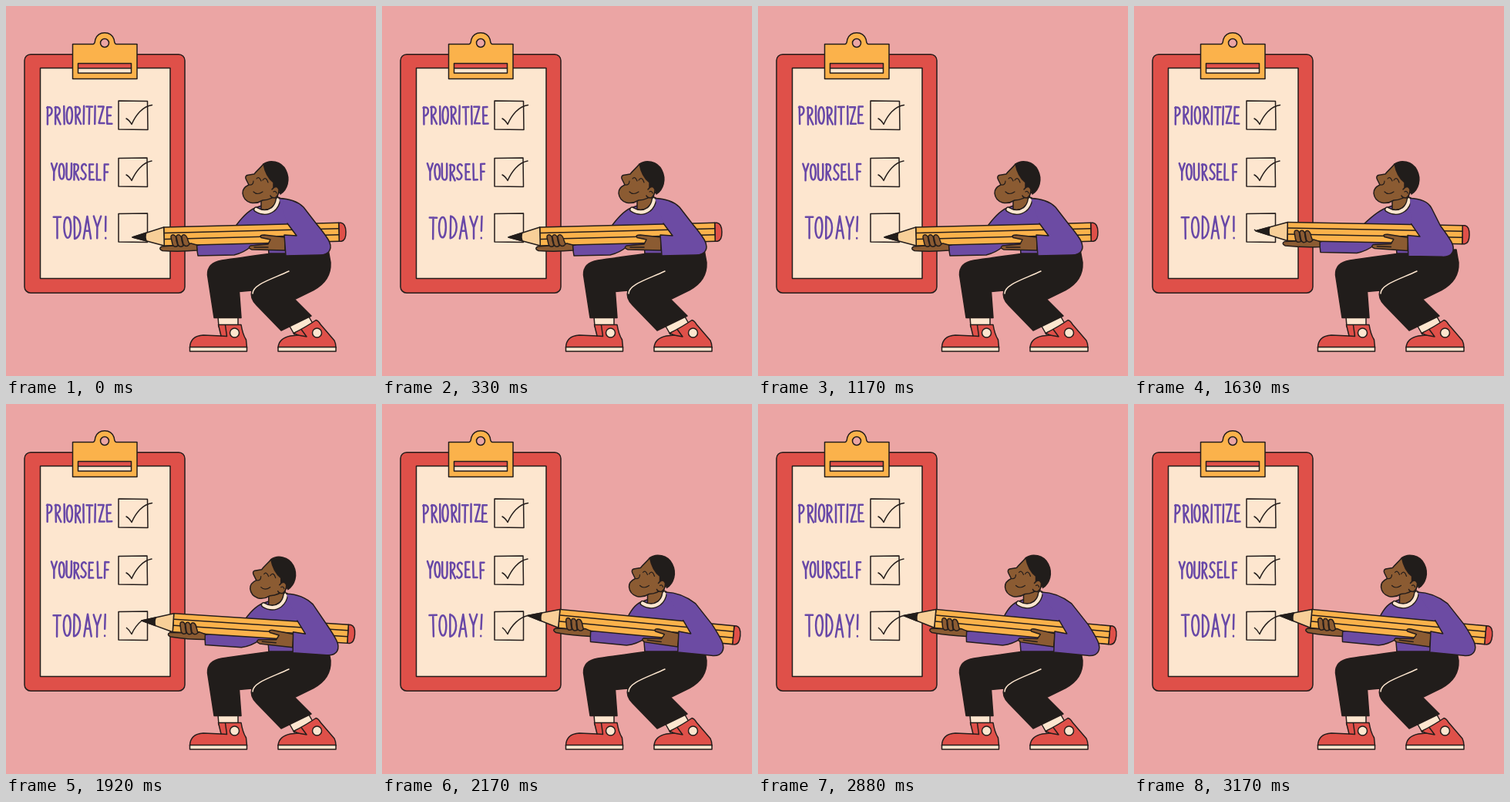
An HTML page for the animation above (3.21 s loop, 480 by 480 pixels).

```html
<!DOCTYPE html>
<html lang="en">
<head>
<meta charset="utf-8">
<title>Prioritize yourself today!</title>
<style>
html, body { margin: 0; width: 100%; height: 100%; overflow: hidden; background: #eba5a4; }
svg { display: block; width: 100%; height: 100%; }
.ink { stroke: #241d1b; stroke-width: 1.5; stroke-linejoin: round; stroke-linecap: round; }
.line { fill: none; }
.red { fill: #df5049; }
.cream { fill: #fde6cf; }
.gold { fill: #fbb24b; }
.skin { fill: #8b5b32; }
.purple { fill: #6c4ba3; }
.dark { fill: #211d1b; }
#words path { fill: none; stroke: #6848a7; stroke-width: 2.5; stroke-linecap: round; stroke-linejoin: round; vector-effect: non-scaling-stroke; }
</style>
</head>
<body>
<svg viewBox="0 0 480 480" class="ink">
  <!-- clipboard -->
  <rect class="red" x="24" y="62.7" width="208" height="309.5" rx="8"/>
  <rect class="cream" x="44.5" y="80.5" width="168.5" height="273"/>
  <path class="gold" d="M86.5 49.5H113C116 49 115 46 116 43C120 32 136 32 140 43C141 46 140 49 143 49.5H170V94.500H86.5Z"/>
  <circle cx="128" cy="48" r="5.5" fill="#eba5a4"/>
  <path class="red" d="M93.5 74.5H162.500V80.800H93.5Z"/>
  <path class="cream" d="M93.5 80.800H162.500V87H93.5Z"/>
  <g id="words" role="img" aria-label="Prioritize yourself today!"></g>
  <g class="line">
    <path d="M146 123L183.5 123.5L184 160.5L146 160Z"/>
    <path d="M146 197.5L183 197L183.5 234.5L146 234Z"/>
    <path d="M146 269.5L183.5 269L183.5 306.5L146 306Z"/>
    <path d="M156 146Q160 148 163 153.5C168 142 177 130 189.5 128.5"/>
    <path d="M156 219Q160 221 163 226.5C168 215 177 203 189 201"/>
    <path id="tick" stroke-linecap="butt" d="M156 290Q160 293 163 298.5C168 287 178 277 189 274.5"/>
  </g>

  <!-- legs and shoes -->
  <path class="cream" d="M275 403L276 416H301V403Z"/>
  <path class="cream" d="M366 412L374 426L398 412L390 398Z"/>
  <path class="red" d="M275.5 413.5L305 413.5Q307 426 311.5 433L312.5 443H238.5Q239 428 256 427L279 428Z"/>
  <path class="line" d="M284.500 414L286.500 428.500L279 428"/>
  <path class="cream" d="M238.5 442.5H312.5V448H238.5Z"/>
  <circle class="cream" cx="296.5" cy="424" r="6"/>
  <path class="red" d="M373 424.500Q390 416 402 407.500Q405 408 408 413L426 434Q428 438 428 443H353Q354 431 369 428L379 427Z"/>
  <path class="line" d="M383 419.500L390 429L379 427"/>
  <path class="cream" d="M353 442.5H428V448H353Z"/>
  <circle class="cream" cx="403.500" cy="424" r="6"/>
  <path class="dark" d="M341 318V321.500Q300 327 280 330Q261 333 261.500 349L270 404.500H305L302.500 370.500L319 369Q316 379 325 388L357 421L396 402L374.500 380.500L399 368.500Q422 356 421 333L418 316Z"/>
  <path class="line" stroke="#fde6cf" d="M320 373C320 361 346 354 367 344"/>

  <path id="torso" class="purple"/>
  <g id="head">
    <path class="skin" d="M331 248L331 264Q344 267 352 252L353 238Z"/>
    <path class="line" stroke-width="7" d="M324.500 264Q336 271 346 264Q352 259 353 251"/>
    <path class="line" stroke="#fde6cf" stroke-width="4.200" d="M324.500 264Q336 271 346 264Q352 259 353 251"/>
    <path class="skin" d="M334 205C330 210 325 214 322 218L313 219.500Q309.500 221 311.500 225L315 232Q306.500 236 307 243Q308 252 317 255Q325 257 333 252Q344 252 355 242L360 222L350 206Z"/>
    <path class="dark" d="M334 205C342 199 357 201 363 213C369 225 365 238 356 244C355 234 350 233 347 236L347 229Q337 221 334 205Z"/>
    <path class="skin" d="M345 238Q351 231 354 238Q354 246 349 249Q344 249 343 246"/>
    <path class="line" stroke-width="1.200" d="M315 232Q321 233 321 227M325 224Q328 220 331 227M333 226Q337 220 340 229M321 241Q326 246 333 241M347 241Q350 239 351 243"/>
  </g>

  <g id="tool">
    <g transform="translate(164 300) rotate(-1.45)">
      <path class="red" d="M268-12H271Q277-11 277 0T271 12H268Z"/>
      <path class="gold" d="M41-12H268V12H41Z"/>
      <path class="line" d="M42-4.500H268M42 3.500H268"/>
      <path fill="#f8cf98" d="M0 0L41-12V12Z"/>
      <path class="dark" d="M0 0L18-5.300Q16 0 18 5.300Z"/>
    </g>
    <!-- far hand -->
    <path class="skin" d="M247.500 310L248 317Q226 319 203 317.500Q197 315 202 312L217 311L240 308Z"/>
    <path class="skin" d="M214 300Q214 296 218 297Q221 299 221 304L223 311Q218 314 216 309ZM221 300Q221 296 225 297Q228 299 228 304L230 311Q225 314 223 309ZM228 300Q228 296 232 297Q235 299 236 304L238 309Q234 314 230 309Z"/>
    <!-- near hand -->
    <path class="skin" d="M362 300L335 297Q328 297 331 300.500L343 303L340 309L317 311Q313 314 319 316L362 317Z"/>
    <path class="line" d="M322 313L340 313"/>
  </g>
  <path id="arm" class="purple"/>
</svg>
<script>
const $ = id => document.getElementById(id);
const LOOP = 3210;
const tick = $('tick'), tickLen = tick.getTotalLength();

// Hand lettering: one stroke skeleton per letter in a 10 x 26 cell
const bowl = 'M1 1V26M0 2C11-2 11 13 1 14';
const glyphs = {
  P: bowl, R: bowl + 'M3 14L9.5 26', I: 'M1 0V26', '!': 'M2 0L1.500 17M1.500 25V25.500',
  O: 'M5 1C-2 1-1 25 5 25S11 1 5 1', T: 'M0 1H10M5 1V26', Z: 'M0 1H9L1 25H10',
  E: 'M8 1H1V25H9M1 13H7', Y: 'M0 0L5 13L10 0M5 13V26', U: 'M0 0V18C0 28 9 28 9 18V0',
  S: 'M9 3C5-2 0 3 1 8S9 15 9 19S4 28 0 23', L: 'M1 0V25H8', F: 'M8 1H1V26M1 13H7',
  D: 'M1 0V26C12 24 12 2 1 0', A: 'M0 26L5 0L10 26M2 17H8'
};
const letters = [];
function write(word, x, y, size) {
  for (const c of word) {
    const path = document.createElementNS('http://www.w3.org/2000/svg', 'path');
    path.setAttribute('d', glyphs[c]);
    $('words').append(path);
    letters.push({ path, x, y, size });
    x += (c === 'I' ? 5 : 12.3) * size;
  }
}
write('PRIORITIZE', 53, 130, .87);
write('YOURSELF', 58.5, 204.5, .8);
write('TODAY!', 61.5, 273, 1.07);

const clamp = v => Math.min(1, Math.max(0, v));
const span = (t, from, to) => clamp((t - from) / (to - from));
const ease = v => v * v * (3 - 2 * v);
const noise = n => { const v = Math.sin(n * 127.1 + 11.7) * 43758.5453; return v - Math.floor(v) - .5; };

function draw(t) {
  const reach = ease(span(t, 1250, 1590));
  const down = span(t, 1590, 1750);
  const up = ease(span(t, 1750, 2050));

  // The pencil tip first reaches the box, then follows the tick
  const drawn = 10.7 * down + (tickLen - 10.7) * up;
  const start = tick.getPointAtLength(drawn);
  const tx = 164 + (start.x - 164) * reach, ty = 300 + (start.y - 300) * reach;
  const angle = 2.5 * reach + 4.35 * up;
  const hx = 4 * reach + 9.5 * up, hy = -5.5 * up;
  tick.setAttribute('stroke-dasharray', `${drawn} 99`);
  $('head').setAttribute('transform', `translate(${hx} ${hy})`);
  $('tool').setAttribute('transform', `translate(${tx} ${ty}) rotate(${angle}) translate(-164 -300)`);

  // Points that follow the head, the pencil, or lie halfway between
  const cos = Math.cos(angle * Math.PI / 180), sin = Math.sin(angle * Math.PI / 180);
  const H = (x, y) => [x + hx, y + hy];
  const P = (x, y) => [tx + (x - 164) * cos - (y - 300) * sin, ty + (x - 164) * sin + (y - 300) * cos];
  const M = (x, y) => { const h = H(x, y), p = P(x, y); return [(h[0] + p[0]) / 2, (h[1] + p[1]) / 2]; };

  $('torso').setAttribute('d', `M${H(354, 251)}L${H(326, 261)}Q${H(314, 264)} ${M(299, 284)}
    L${P(285, 299)}L${P(247, 311)}L${P(249, 324)}L${P(296, 323)}Q${P(309, 320)} ${P(319, 311)}
    L340 309L341 321L408 321L${P(400, 300)}L${H(368, 260)}`);
  $('arm').setAttribute('d', `M${P(365, 282)}L${P(377, 298)}L${P(361, 297)}L${P(363, 324)}
    L${P(407, 323)}C${P(421, 323)} ${P(424, 313)} ${P(418, 303)}
    Q${P(413, 295)} ${P(403, 283)}L${M(386, 261)}Q${H(375, 250)} ${H(354, 249.5)}`);

  const step = Math.floor(t / 125);
  letters.forEach(({ path, x, y, size }, i) => {
    const n = i * 31 + step * 7;
    path.setAttribute('transform', `translate(${x + noise(n)} ${y + noise(n + 1)})
      rotate(${noise(n + 2) * 3}) scale(${size * .88} ${size * 1.03})`);
  });
}

function frame() {
  draw(performance.now() % LOOP);
  requestAnimationFrame(frame);
}
frame();
</script>
</body>
</html>
```
